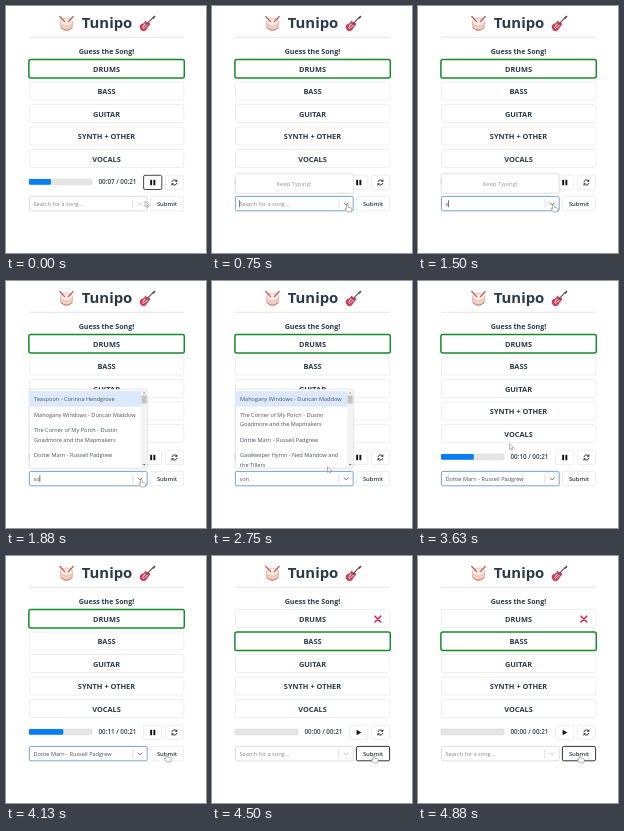
An HTML page for the animation above (5.01 s loop, 200 by 247 pixels).

```html
<!DOCTYPE html>
<html lang="en">
<head>
<meta charset="utf-8">
<title>Tunipo</title>
<style>
  html, body { margin: 0; width: 100%; height: 100%; overflow: hidden; background: #fff; }
  svg { display: block; width: 100vw; height: 100vh; }
  text { font-family: "Open Sans", "Noto Sans", sans-serif; }
</style>
</head>
<body>
<svg id="stage" viewBox="0 0 200 247"></svg>
<script>
const LOOP = 5010, STEP = 125;
const OPEN = 375, TYPED = [1375, 1625, 2125], PICK = 3500, SUBMIT = 4375;
const INK = '#2c3a49', GREEN = '#168a28', LINE = '#e6e8ea', MUTED = '#858585';
const BODY_SIZE = 5.6;
const BAR = { x: 23, width: 63, seconds: 21 };
const PICKED = 'Dottie Marn - Russell Padgrew';
const SONGS = [
  ['Teaspoon - Corinna Hendgrove'],
  ['Mahogany Windows - Duncan Maddow'],
  ['The Corner of My Porch - Dustin', 'Goadmore and the Mapmakers'],
  [PICKED],
  ['Gatekeeper Hymn - Ned Mandow and', 'the Tillers'],
];
// time, x, y of the pointer tip
const POINTER = [
  [0, 139, 195], [125, 139, 195], [375, 134.5, 198], [2250, 134.5, 198],
  [2625, 115.5, 185.7], [2750, 115.5, 185.7], [3250, 83.5, 158.5], [3500, 83.5, 158.5],
  [4125, 160, 198], [4500, 161, 199], [LOOP, 161, 199],
];

const stage = document.getElementById('stage');

const rect = (x, y, w, h, fill, stroke = 'none', sw = 0.7, r = 1.5) =>
  `<rect x="${x}" y="${y}" width="${w}" height="${h}" rx="${r}" fill="${fill}" stroke="${stroke}" stroke-width="${sw}"/>`;
const path = (d, fill, stroke = 'none', sw = 1, extra = '') =>
  `<path d="${d}" fill="${fill}" stroke="${stroke}" stroke-width="${sw}" stroke-linejoin="round" ${extra}/>`;
const text = (s, x, y, size, { fill = INK, weight = 400, anchor = 'start' } = {}) =>
  `<text x="${x}" y="${y}" font-size="${size}" font-weight="${weight}" fill="${fill}" text-anchor="${anchor}">${s}</text>`;
const label = (s, x, y, size, weight = 600) => text(s, x, y, size, { weight, anchor: 'middle' });

function pointerAt(t) {
  const i = POINTER.findIndex(p => p[0] > t);
  const [t0, x0, y0] = POINTER[i - 1], [t1, x1, y1] = POINTER[i];
  const u = (t - t0) / (t1 - t0), e = u * u * (3 - 2 * u);
  return { x: x0 + (x1 - x0) * e, y: y0 + (y1 - y0) * e };
}

const drum = () =>
  path('M54.6 16V21.5Q60.5 27.5 66.4 21.5V16Z', '#f0d3c6', '#d9968a', 0.6) +
  path('M55 21.5Q60.5 26.8 66 21.5', 'none', '#cf7a70', 1) +
  '<ellipse cx="60.5" cy="16" rx="6.1" ry="4" fill="#f8ebe3" stroke="#dda194" stroke-width=".6"/>' +
  path('M53.8 10.5L58.6 15.6M67.2 10.5L62.4 15.6', 'none', '#c25a55', 1.3, 'stroke-linecap="round"');

const guitar = () =>
  path('M139.5 14.8Q141 17.5 143 16.8Q145 17.6 143 19.8Q141 21 140.7 23Q139 26 135.4 24.2Q132.6 21 135 18.6Q138.5 18 139.5 14.8Z', '#d93a55', '#b02843', 0.5) +
  path('M138.8 17.6L141.8 19.2L138.8 22L136.6 20.4Z', '#f6e3e3') +
  path('M138 21L147 11.6', 'none', '#6b5a5f', 1.2) +
  path('M146 11.9L148.3 9.4L149.6 10.8L147.3 13.1Z', '#574a50') +
  path('M136.3 21.2L138.3 23.2', 'none', '#f6e3e3', 0.8);

function header() {
  return drum() + guitar() + label('Tunipo', 101, 22.4, 14.9, 700) +
    rect(23, 30.8, 155, 0.8, '#dcdcdc', 'none', 0, 0) +
    label('Guess the Song!', 100.5, 47.8, 7.1, 700);
}

function tracks(active, failed) {
  return ['DRUMS', 'BASS', 'GUITAR', 'SYNTH + OTHER', 'VOCALS'].map((name, i) => {
    const y = 53.5 + i * 22.5;
    const box = i === active
      ? rect(22.9, y, 155.4, 18.5, '#fff', GREEN, 1.5, 2)
      : rect(23.4, y, 154.4, 18, '#fff', LINE);
    return box + label(name, 100.5, y + 12.3, 7.4, 700);
  }).join('') +
    (failed ? path('M163 60.2L168.7 66M168.7 60.2L163 66', 'none', '#e0244e', 1.6, 'stroke-linecap="round"') : '');
}

function player(seconds, playing, focused) {
  const clock = '00:' + String(Math.floor(seconds)).padStart(2, '0');
  const icon = playing
    ? rect(144.2, 173.8, 1.9, 5.4, '#111', 'none', 0, 0) + rect(147.4, 173.8, 1.9, 5.4, '#111', 'none', 0, 0)
    : path('M144.6 173.8L149.4 176.5L144.6 179.2Z', '#111');
  return rect(BAR.x, 173, BAR.width, 5.8, '#e5e5e5', '#d2d2d2', 0.5, 1.2) +
    (seconds ? rect(BAR.x, 173, BAR.width * seconds / BAR.seconds, 5.8, '#087cf5', 'none', 0, 1.2) : '') +
    label(`${clock} / 00:21`, 111.5, 178.3, 6.3) +
    rect(137.6, 169.3, 18.2, 14.2, '#fff', focused ? '#444' : LINE, focused ? 1 : 0.7) + icon +
    rect(159.4, 169.3, 18.2, 14.2, '#fff', LINE) +
    path('M166 176A2.5 2.5 0 0 1 170.4 174.8M170.8 177A2.5 2.5 0 0 1 166.4 178.2', 'none', '#222', 0.9) +
    path('M171.3 173.2V175.8H168.8ZM165.5 179.8V177.2H168Z', '#222');
}

function search({ typed, value, focused, caret, submitFocus }) {
  const shown = value || typed;
  const caretX = 27.4 + [0, 2.8, 6.2, 9.8][typed.length];
  const chevron = focused ? '#666' : '#c4c4c4';
  return rect(23.4, 190.4, 117.8, 14.4, '#fff', focused ? '#6b99c6' : '#d2d2d2', focused ? 0.9 : 0.7) +
    text(shown || 'Search for a song...', 27.5, 200, BODY_SIZE, { fill: shown ? '#48505a' : MUTED }) +
    (caret ? rect(caretX, 194.2, 0.6, 7, '#222', 'none', 0, 0) : '') +
    rect(126.6, 193, 0.6, 9.3, '#ccc', 'none', 0, 0) +
    path('M132 196.7L134.2 198.9L136.4 196.7', 'none', chevron, 1) +
    rect(144.4, 190.4, 33.2, 14.4, '#fff', submitFocus ? '#333' : LINE, submitFocus ? 1 : 0.7) +
    label('Submit', 161, 199.9, 5.9);
}

const panel = (y, h) =>
  `<g style="filter:drop-shadow(0 .8px 1px #0002)">${rect(23.3, y, 117.8, h, '#fff', '#dedede', 0.6)}</g>`;

const hint = () => panel(168, 19) +
  text('Keep Typing!', 82, 180, 5.9, { fill: '#999', anchor: 'middle' });

function songList(songs, pointerY, hovering) {
  let y = 110;
  const rows = songs.map(lines => {
    const row = { lines, y, h: lines.length > 1 ? 24.9 : 15.7 };
    y += row.h;
    return row;
  });
  const hit = hovering ? rows.findIndex(r => pointerY >= r.y && pointerY < r.y + r.h) : 0;
  const body = rows.map((r, i) =>
    (i === Math.max(hit, 0) ? rect(23.6, r.y, 111.4, r.h, '#dce9fc', 'none', 0, 0) : '') +
    r.lines.map((s, n) => text(s, 28, r.y + 10 + n * 9.2, BODY_SIZE, { fill: '#46505c' })).join('')
  ).join('');
  return panel(108.3, 78.7) +
    `<clipPath id="view"><rect x="23" y="108.6" width="118" height="78.2"/></clipPath><g clip-path="url(#view)">${body}` +
    rect(135, 108.6, 6.2, 78.4, '#f3f3f3', 'none', 0, 0) +
    rect(135.5, 114.5, 5.2, 8, '#c3c3c3', 'none', 0, 0) +
    path('M136.9 112.5L138.2 111L139.5 112.5Z', '#999') +
    path('M136.9 183L138.2 184.5L139.5 183Z', '#555') + '</g>';
}

function pointer({ x, y }, hand) {
  const d = hand
    ? 'M0 .6Q.9-.4 1.7 .6V3.2L4.6 3.9Q5.6 4.3 5.3 5.5L4.6 8H.9L-1.6 5Q-1.6 3.9-.6 4.2L0 4.7Z'
    : 'M0 0V5.6L1.3 4.5L2.2 6.5L3.2 6.1L2.4 4.1H4.1Z';
  return path(d, '#fff', '#666', 0.5, `transform="translate(${x} ${y})"`);
}

function draw(t) {
  const open = t >= OPEN && t < PICK;
  const done = t >= SUBMIT;
  const count = open ? TYPED.filter(at => t >= at).length : 0;
  const typed = 'son'.slice(0, count);
  const lastKey = count ? TYPED[count - 1] : OPEN;
  const tip = pointerAt(t);
  const hand = (t >= OPEN && t < 2375) || t >= 4000;
  let menu = '';
  if (open) {
    menu = count < 2 ? hint()
      : songList(count === 2 ? SONGS : SONGS.slice(1), tip.y, t > 2750);
  }
  stage.innerHTML = header() + tracks(done ? 1 : 0, done) +
    player(done ? 0 : 7.3 + t / 1000, !done, t < OPEN) +
    search({
      typed,
      value: t >= PICK && !done ? PICKED : '',
      focused: t >= OPEN && !done,
      caret: open && (t - lastKey) % 1060 < 530,
      submitFocus: done,
    }) + menu + pointer(tip, hand);
}

const start = performance.now();
let shown = -1;
function tick() {
  const t = Math.max(0, performance.now() - start) % LOOP;
  const step = Math.min(39, Math.floor(t / STEP));
  if (step !== shown) draw((shown = step) * STEP);
  requestAnimationFrame(tick);
}
tick();
</script>
</body>
</html>
```
